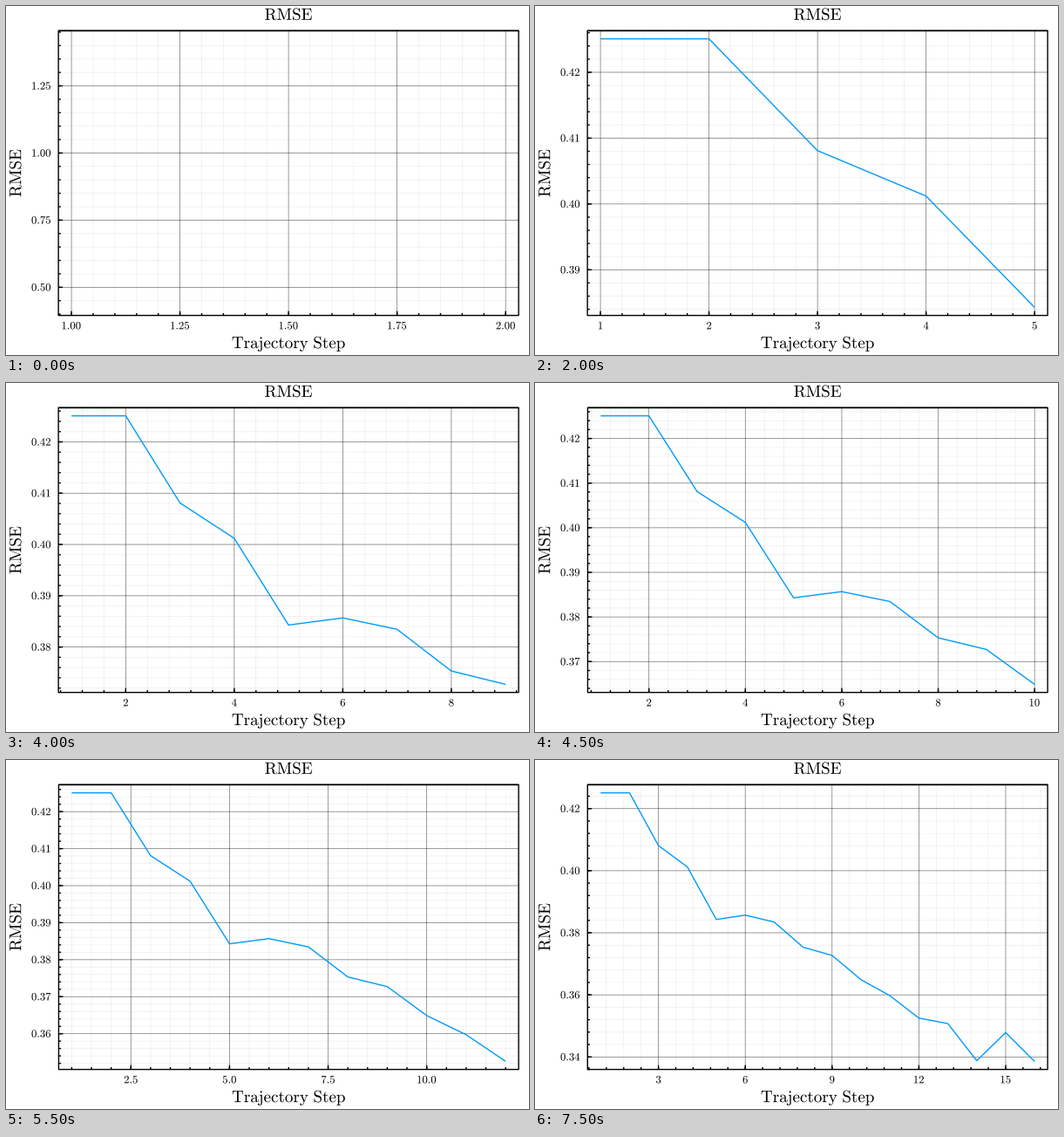
Animation of 600 by 400 pixels, one loop 8000 ms. Source, as a matplotlib script:

```python
import math

import matplotlib.pyplot as plt
from matplotlib.animation import FuncAnimation
from matplotlib.collections import LineCollection
from matplotlib.patches import PathPatch
from matplotlib.textpath import TextPath
from matplotlib.transforms import Affine2D

plt.rcParams["mathtext.fontset"] = "cm"

W, H, DPI = 600, 400, 100
RIGHT, TOP, BOTTOM = 588.1, 28.4, 354.65
LABEL_X, LABEL_GAP = 29.0, 9.08
TICK_EM, GUIDE_EM = 12.7, 19.05
BLUE = "#009AFA"

RMSE = [0.42508, 0.42508, 0.4081, 0.4012, 0.38429, 0.38568, 0.38346, 0.37533,
        0.37272, 0.36489, 0.35972, 0.35252, 0.35075, 0.33879, 0.34785, 0.33857]

# Tick step mantissas and how nice each one is
NICENESS = {1: 1.0, 5: 0.9, 2: 0.7, 2.5: 0.5, 3: 0.2}
STEPS = sorted(((m * 10.0 ** z, nice) for m, nice in NICENESS.items()
                for z in range(-4, 2)), reverse=True)

fig = plt.figure(figsize=(W / DPI, H / DPI), dpi=DPI, facecolor="white")
ax = fig.add_axes([0, 0, 1, 1])


def px(width):
    return width * 72 / DPI


def limits(lo, hi):
    """Widen a range by 3 % on both sides; an empty range becomes one unit."""
    if hi == lo:
        hi = lo + 1
    pad = 0.03 * (hi - lo)
    return lo - pad, hi + pad


def multiples(lo, hi, step):
    first = math.ceil(lo / step - 1e-9)
    last = math.floor(hi / step + 1e-9)
    return [i * step for i in range(first, last + 1)]


def best_step(lo, hi):
    """Step with the best mix of tick count, coverage and niceness."""
    best, top_score = None, -1.0
    for step, nice in STEPS:
        count = len(multiples(lo, hi, step))
        if not 4 <= count <= 8:
            continue
        score = (0.25 * (1 - abs(count - 5) / 5)
                 + 0.5 * (hi - lo) / ((count - 1) * step)
                 + 0.25 * nice)
        if score > top_score + 1e-9:
            best, top_score = step, score
    return best


def tick_labels(ticks, step):
    digits = next(d for d in range(5)
                  if abs(step * 10 ** d - round(step * 10 ** d)) < 1e-6)
    return [f"{t:.{digits}f}" for t in ticks]


def text_path(text, em):
    body = text.replace(" ", r"\ ")
    return TextPath((0, 0), rf"$\mathrm{{{body}}}$", size=em)


def put_text(text, x, y, em, center=True, rotation=0):
    """Place text with its baseline at y (or at x when rotated)."""
    path = text_path(text, em)
    box = path.get_extents()
    shift = -(box.x0 + box.x1) / 2 if center else 0
    move = (Affine2D().translate(shift, 0).rotate_deg(rotation)
            .scale(1, -1).translate(x, y))
    ax.add_patch(PathPatch(move.transform_path(path), fc="black", lw=0))


def put_lines(segments, width, color="black", alpha=1.0):
    lines = LineCollection(segments, linewidths=px(width), colors=color,
                           alpha=alpha, capstyle="butt")
    lines.set_snap(False)
    ax.add_collection(lines, autolim=False)


def draw(frame):
    ax.clear()
    ax.set_xlim(0, W)
    ax.set_ylim(H, 0)
    ax.axis("off")

    values = RMSE[:frame + 1]
    n = len(values)
    x0, x1 = limits(1, n)
    y0, y1 = limits(min(values), max(values))
    xstep, ystep = best_step(x0, x1), best_step(y0, y1)
    xticks, yticks = multiples(x0, x1, xstep), multiples(y0, y1, ystep)
    xlabels, ylabels = tick_labels(xticks, xstep), tick_labels(yticks, ystep)

    # The plot area starts right of the widest tick label
    widest = max(text_path(s, TICK_EM).get_extents().x1 for s in ylabels)
    left = LABEL_X + widest + LABEL_GAP

    def sx(x):
        return left + (x - x0) / (x1 - x0) * (RIGHT - left)

    def sy(y):
        return BOTTOM - (y - y0) / (y1 - y0) * (BOTTOM - TOP)

    xs, ys = [sx(t) for t in xticks], [sy(t) for t in yticks]
    xminor = [sx(t) for t in multiples(x0, x1, xstep / 5)]
    yminor = [sy(t) for t in multiples(y0, y1, ystep / 5)]

    def grid(cols, rows):
        return ([[(x, TOP), (x, BOTTOM)] for x in cols]
                + [[(left, y), (RIGHT, y)] for y in rows])

    def marks(cols, rows, size):
        return ([[(x, BOTTOM), (x, BOTTOM - size)] for x in cols]
                + [[(left, y), (left + size, y)] for y in rows])

    put_lines(grid(xminor, yminor), 0.7, alpha=0.07)
    put_lines(grid(xs, ys), 0.7, alpha=0.5)
    put_lines(marks(xminor, yminor, 2.7), 1.39)
    put_lines(marks(xs, ys, 5), 1.39)
    put_lines([[(left, TOP), (RIGHT, TOP), (RIGHT, BOTTOM), (left, BOTTOM),
                (left, TOP), (RIGHT, TOP)]], 1.39)

    for x, s in zip(xs, xlabels):
        put_text(s, x, 370.4, TICK_EM)
    for y, s in zip(ys, ylabels):
        put_text(s, LABEL_X, y + 4.1, TICK_EM, center=False)

    middle = (left + RIGHT) / 2
    put_text("RMSE", middle, 15.9, GUIDE_EM)
    put_text("Trajectory Step", middle, 392.2, GUIDE_EM)
    put_text("RMSE", 17.3, (TOP + BOTTOM) / 2, GUIDE_EM, rotation=90)

    if n > 1:
        points = [(sx(i + 1), sy(v)) for i, v in enumerate(values)]
        put_lines([points], 1.39, BLUE)
    return []


anim = FuncAnimation(fig, draw, frames=len(RMSE), interval=500,
                     repeat=True, repeat_delay=0, init_func=lambda: draw(0))

plt.show()
```
